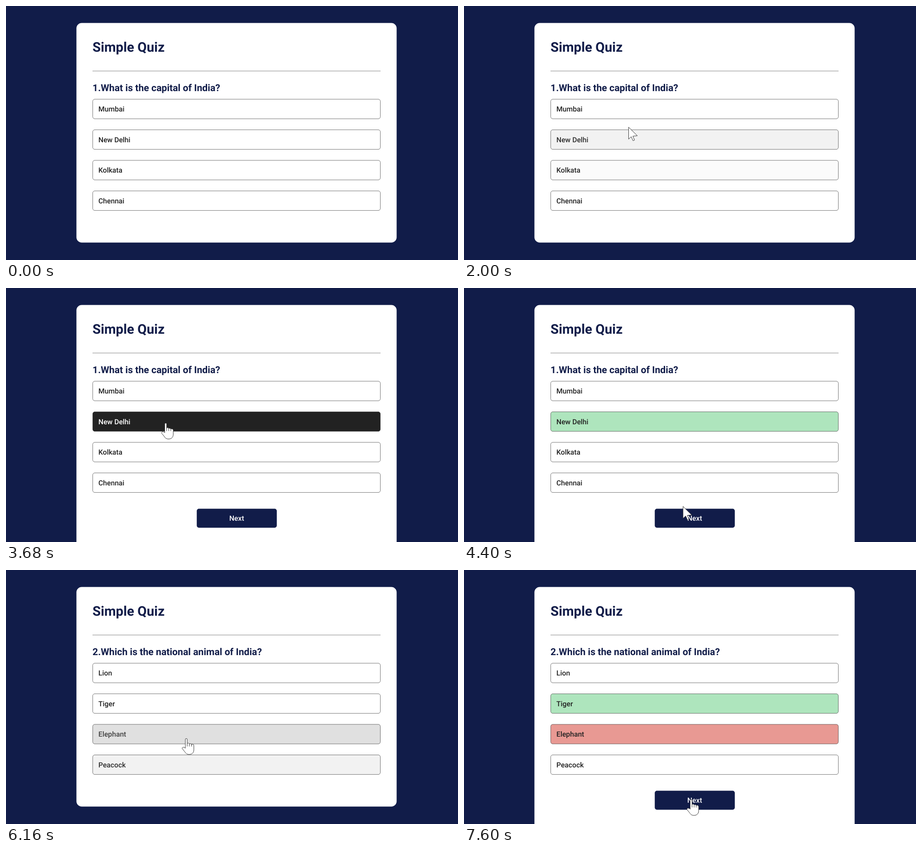
An HTML page for the animation above (8000 ms loop, 998 by 561 pixels).

```html
<!DOCTYPE html>
<html lang="en">
<head>
<meta charset="utf-8">
<title>Simple Quiz</title>
<style>
  html, body { margin: 0; width: 100%; height: 100%; overflow: hidden; background: #111c49; }
  svg { display: block; width: 998px; height: 561px; font-family: Roboto, "Open Sans", sans-serif; font-weight: 500; text-rendering: geometricPrecision; }
  .heading { fill: #131e4a; font-weight: 600; }
  .option rect { stroke: #222; stroke-opacity: .63; }
  .option text, #next text { font-size: 15.71px; }
  #next rect { fill: #111c49; }
  #next text { fill: #fff; text-anchor: middle; }
  #cursor path { fill: #fff; stroke: #333; stroke-linejoin: round; stroke-linecap: round; }
</style>
</head>
<body>
<svg viewBox="0 0 998 561">
  <rect width="998" height="561" fill="#111c49"/>
  <rect id="card" x="155.5" y="37.5" width="707" height="485" rx="11.8" fill="#fff"/>
  <text class="heading" x="191" y="100.8" font-size="29.55">Simple Quiz</text>
  <path d="M191 143.6H827" stroke="#222" stroke-opacity=".55"/>
  <text id="question" class="heading" x="191" y="188.2" font-size="21.2"></text>
  <g id="options"></g>
  <g id="next">
    <rect x="421.2" y="487.5" width="176.7" height="42" rx="4.7"/>
    <text x="509.3" y="514.2">Next</text>
  </g>
  <g id="cursor">
    <path id="arrow" d="M0 0V26L5.8 20.7 9.8 29.6 13.2 28 9.4 19.4 19 18.6Z"/>
    <path id="hand" d="M-2 20V1.5a2.1 2.1 0 0 1 4.2 0V11c.5-2 4.3-2 4.6.6c.8-1.6 4.2-1.2 4.6 1c1-1.3 5-.6 5.4 2V24C16.8 31 12.5 34.5 6.5 34.5C1 34.5-1 32-3 29L-9 21.5C-9.5 18.5-6 17.3-2 20.5ZM2.2 11v5.5M6.8 11.6v5M11.4 12.6v4"/>
  </g>
</svg>
<script>
const LOOP = 8000, STEP = 80, FADE = 300, NEXT_CLICK = 5120;
const LAG = 15; // the page is painted slightly behind the pointer
const WHITE = [255, 255, 255], DARK = [34, 34, 34];
const GREEN = [174, 229, 189], RED = [232, 153, 147];

const quiz = [
  { text: '1.What is the capital of India?', options: ['Mumbai', 'New Delhi', 'Kolkata', 'Chennai'],
    answerAt: 3680, tints: { 1: GREEN } },
  { text: '2.Which is the national animal of India?', options: ['Lion', 'Tiger', 'Elephant', 'Peacock'],
    answerAt: 6720, tints: { 1: GREEN, 2: RED } }
];

// Pointer gestures, each eased from wherever the last one ended
const home = [697.5, 477.5];
const moves = [
  { at: 1120, for: 80, to: [885, 472] },
  { at: 1200, for: 80, to: [835, 395] },
  { at: 1280, for: 160, to: [242.5, 390.5] },
  { at: 1720, for: 160, to: [320, 388] },
  { at: 1883, for: 170, to: [376.5, 232] },
  { at: 2080, for: 240, to: [350.5, 236] },
  { at: 2407, for: 160, to: [352.5, 299] },
  { at: 3740, for: 860, to: [504.5, 512] },
  { at: 5520, for: 80, to: [442.5, 437.5] },
  { at: 5794, for: 200, to: [403, 400] },
  { at: 5994, for: 256, to: [396, 362] },
  { at: 6760, for: 840, to: [501.3, 507.5] }
];

const $ = id => document.getElementById(id);
const clamp = v => Math.min(1, Math.max(0, v));
const smooth = u => u * u * (3 - 2 * u);
const mix = (a, b, k) => a.map((v, i) => v + (b[i] - v) * k);
const css = c => `rgb(${c.map(Math.round)})`;
const rowMid = i => 227.5 + 67.5 * i;
const pageAt = t => quiz[t < NEXT_CLICK ? 0 : 1];
const tipAt = t => moves.reduce((p, m) => mix(p, m.to, smooth(clamp((t - m.at) / m.for))), home);
const isShown = t => t >= 1200 || (t >= 400 && t < 480);

function rowAt([x, y]) {
  const i = Math.round((y - rowMid(0)) / 67.5);
  return x > 191 && x < 827 && i >= 0 && i < 4 && Math.abs(y - rowMid(i)) < 22 ? i : -1;
}

const onNext = ([x, y]) => x > 421 && x < 598 && y > 487 && y < 530;

// The CSS "ease" curve
function ease(x) {
  if (x <= 0 || x >= 1) return clamp(x);
  let lo = 0, hi = 1, s;
  for (let i = 0; i < 20; i++) {
    s = (lo + hi) / 2;
    if (.75 * s * (1 - s) + s ** 3 < x) lo = s; else hi = s;
  }
  return .3 * s * (1 - s) ** 2 + 3 * s * s * (1 - s) + s ** 3;
}

// Follow the pointer once to learn which rows it visits, and when
function findVisits() {
  const visits = [];
  let open = { row: -1 };
  for (let t = 1200; t < LOOP; t++) {
    const page = pageAt(t), row = rowAt(tipAt(t));
    if (t >= page.answerAt || row === open.row) continue;
    open.leave = t;
    open = { page, row, enter: t, leave: Infinity };
    visits.push(open);
  }
  return visits;
}
const visits = findVisits();

function hoverLevel(page, row, t) {
  const levels = visits.filter(v => v.page === page && v.row === row && t > v.enter).map(v => {
    const peak = ease((Math.min(t, v.leave) - v.enter) / FADE);
    return t > v.leave ? peak * (1 - ease((t - v.leave) / (FADE * peak))) : peak;
  });
  return Math.max(0, ...levels);
}

$('options').innerHTML = [0, 1, 2, 3].map(i => `<g class="option">
  <rect x="191.5" y="${rowMid(i) - 21.6}" width="635" height="43.2" rx="4.5"/>
  <text x="204" y="${rowMid(i) + 5.6}"></text></g>`).join('');
const rows = [...document.querySelectorAll('.option')].map(g => ({
  box: g.querySelector('rect'), label: g.querySelector('text')
}));

function show(id, visible) {
  $(id).style.display = visible ? '' : 'none';
}

function render(t) {
  const page = pageAt(t), answered = t >= page.answerAt;
  $('question').textContent = page.text;
  $('card').setAttribute('height', answered ? 540 : 485);
  show('next', answered);

  rows.forEach(({ box, label }, i) => {
    const level = hoverLevel(page, i, t - LAG);
    const tint = page.tints[i], k = tint ? ease((t - LAG - page.answerAt) / FADE) : 0;
    box.style.fill = css(mix(mix(WHITE, DARK, level), tint || WHITE, k));
    label.style.fill = css(mix(mix(DARK, WHITE, level), DARK, k));
    label.textContent = page.options[i];
  });

  const tip = tipAt(t), hand = rowAt(tip) >= 0 || onNext(tip);
  $('cursor').setAttribute('transform', `translate(${tip})`);
  show('cursor', isShown(t));
  show('hand', hand);
  show('arrow', !hand);
}

const start = performance.now();
function tick() {
  const t = (performance.now() - start) % LOOP;
  render(Math.floor(t / STEP) * STEP);
  requestAnimationFrame(tick);
}
tick();
</script>
</body>
</html>
```
